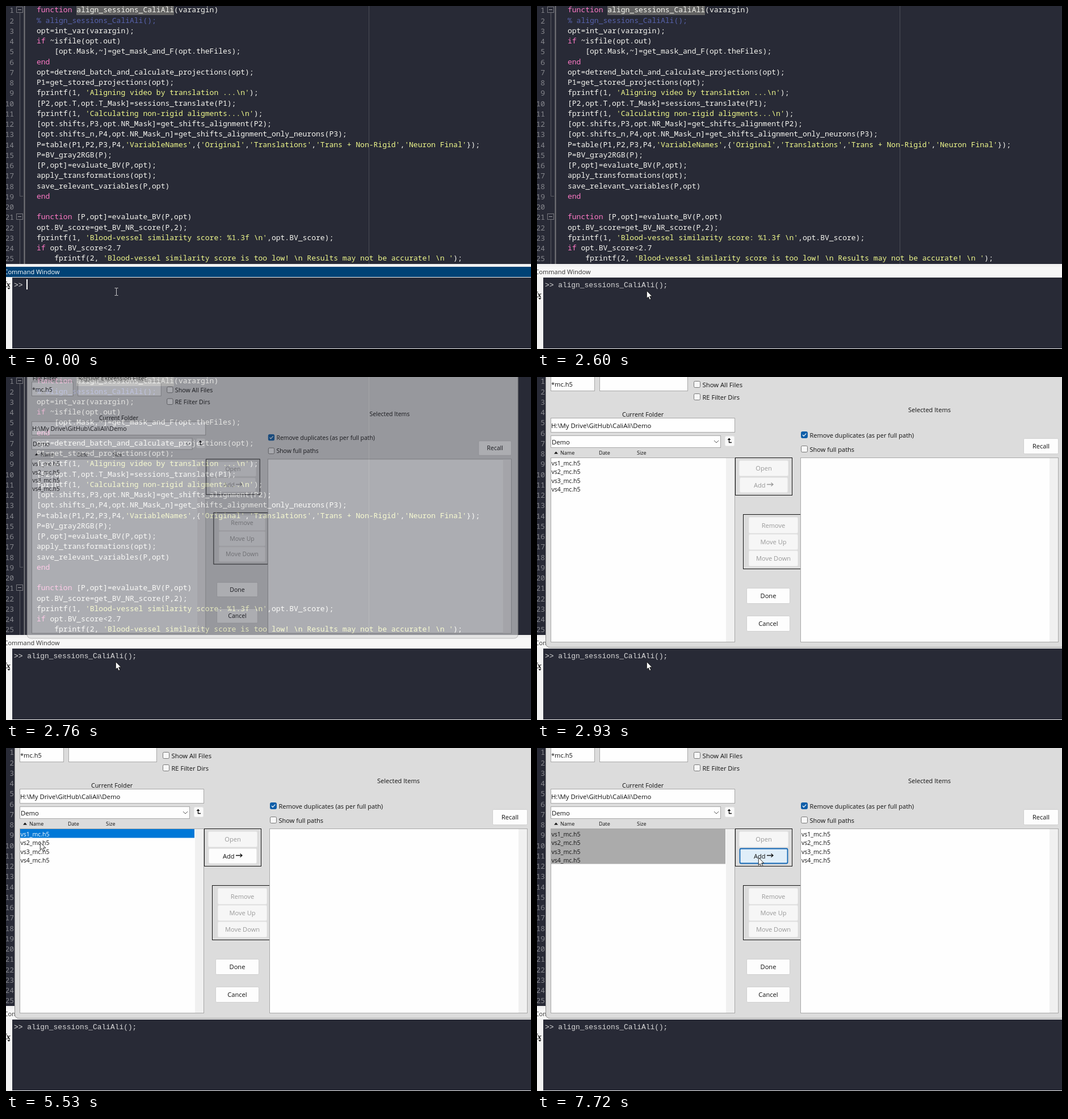
An HTML page for the animation above (8 s loop, 925x605 px).

```html
<!DOCTYPE html>
<html lang="en">
<head>
<meta charset="utf-8">
<title>Aligning sessions</title>
<style>
  html, body { margin: 0; width: 100%; height: 100%; overflow: hidden; background: #282a36; }
  svg { display: block; width: 925px; height: 605px; }
  text { white-space: pre; font-family: "Open Sans", "Noto Sans", sans-serif; }
  .code { font: 500 13.02px "Noto Sans Mono", monospace; }
  .cmd { font: 12.88px "Liberation Mono", monospace; }
  .fx { font: italic bold 14px "Liberation Serif", serif; }
</style>
</head>
<body>
<svg id="stage" viewBox="0 0 925 605"></svg>
<script>
const source = String.raw`function align_sessions_CaliAli(varargin)
% align_sessions_CaliAli();
opt=int_var(varargin);
if ~isfile(opt.out)
    [opt.Mask,~]=get_mask_and_F(opt.theFiles);
end
opt=detrend_batch_and_calculate_projections(opt);
P1=get_stored_projections(opt);
fprintf(1, 'Aligning video by translation ...\n');
[P2,opt.T,opt.T_Mask]=sessions_translate(P1);
fprintf(1, 'Calculating non-rigid aligments...\n');
[opt.shifts,P3,opt.NR_Mask]=get_shifts_alignment(P2);
[opt.shifts_n,P4,opt.NR_Mask_n]=get_shifts_alignment_only_neurons(P3);
P=table(P1,P2,P3,P4,'VariableNames',{'Original','Translations','Trans + Non-Rigid','Neuron Final'});
P=BV_gray2RGB(P);
[P,opt]=evaluate_BV(P,opt);
apply_transformations(opt);
save_relevant_variables(P,opt)
end

function [P,opt]=evaluate_BV(P,opt)
opt.BV_score=get_BV_NR_score(P,2);
fprintf(1, 'Blood-vessel similarity score: %1.3f \n',opt.BV_score);
if opt.BV_score<2.7
    fprintf(2, 'Blood-vessel similarity score is too low! \n Results may not be accurate! \n ');`.split('\n');

const files = [1, 2, 3, 4].map(n => `vs${n}_mc.h5`);

// Markup helpers
const rect = (x, y, w, h, fill, stroke = 'none', r = 0, more = '') =>
  `<rect x="${x}" y="${y}" width="${w}" height="${h}" rx="${r}" fill="${fill}" stroke="${stroke}" ${more}/>`;
const path = (d, stroke, width = 1, fill = 'none', more = '') =>
  `<path d="${d}" stroke="${stroke}" stroke-width="${width}" fill="${fill}" ${more}/>`;
const label = (x, y, s, size = 11.1, fill = '#111', more = '') =>
  `<text x="${x}" y="${y}" font-size="${size}" fill="${fill}" ${more}>${s}</text>`;
const mid = (x, y, s, size, fill) => label(x, y, s, size, fill, 'text-anchor="middle"');
const group = (id, body, more = '') => `<g id="${id}" ${more}>${body}</g>`;

const button = (x, y, w, h, s, on = true) =>
  rect(x + .5, y + .5, w - 1, h - 1, on ? '#fdfdfd' : '#f6f6f6', on ? '#cfcfcf' : '#ebebeb', 2) +
  mid(x + w / 2, y + h / 2 + 4, s, 11.1, on ? '#111' : '#999');
const field = (x, y, w, h) => rect(x + .5, y + .5, w - 1, h - 1, 'var(--field)', '#a8a8a8');
const check = (x, y, s, size, on) =>
  rect(x + .5, y + .5, 11, 11, on ? '#0f5ea8' : '#f6f6f6', on ? '#0f5ea8' : '#777', 2) +
  (on ? path(`M${x + 3} ${y + 6}l2 2.3l4.3 -4.6`, '#fff', 1.2) : '') +
  label(x + 15.5, y + 10.5, s, size);
const fileList = (x, fill) => files.map((s, i) => label(x, 155.5 + i * 15.5, s, 10.5, fill)).join('');
const list = (x, w) => field(x, 142, w, 326) + rect(x + w - 16, 143, 15, 324, '#f0f0f0');

function highlight(line) {
  const colors = { "'": '#f1fa8c', '%': '#5863ad' };
  return line.replace(/</g, '&lt;').replace(/'[^']*'|^%.*|\b(function|if|end)\b/g, s =>
    `<tspan fill="${colors[s[0]] || '#ff79c6'}">${s}</tspan>`);
}

function editor() {
  const foldBox = y => rect(18.5, y + .5, 11, 10, '#282a36', '#77787e') + path(`M21 ${y + 5.5}h6`, '#a5a5a8');
  return rect(0, 0, 925, 455, '#282a36') +
    rect(124, 0, 172, 16, '#626262') +
    path('M24.5 12V335.5H30M24.5 377V455', '#5c5d64') +
    path('M32.5 0V455', '#77777b', 2) +
    path('M639.5 0V455', '#4a4c55') +
    foldBox(1) + foldBox(366) +
    source.map((line, i) => {
      const y = Math.round(11.4 + i * 18.25);
      return `<text class="code" x="14" y="${y + 1}" fill="#85868c" text-anchor="end">${i + 1}</text>` +
        `<text class="code" x="54" y="${y}" fill="#f8f8f2">${highlight(line)}</text>`;
    }).join('');
}

function commandWindow() {
  return rect(0, 455, 925, 150, '#f2f2f2') +
    rect(0, 460, 925, 18, '#004275', 'none', 0, 'id="bar"') +
    label(-3.5, 473, 'Command Window', 11, '#fff', 'id="barText"') +
    rect(11, 479, 914, 125, '#282a36') +
    group('fx', '<text class="fx" x="-4" y="4" fill="#111">fx</text>' + path('M2.5 5h5l-2.5 3z', 'none', 0, '#111')) +
    '<text class="cmd" x="14" y="496" fill="#d9d9d9">&gt;&gt; <tspan id="command">align_sessions_CaliAli();</tspan></text>' +
    rect(36, 482, 2, 18, '#fff', 'none', 0, 'id="caret"');
}

function dialog() {
  return path('M15.5 -18V469q0 8 8 8H923q8 0 8 -8V-18z', '#8d8d8d', 1, '#dcdcdc') +
    rect(15, -27, 916, 10, '#40566c') +
    mid(49, -4, 'File Filter') + mid(175, -4, 'Regular Expression Filter') +
    field(24, -2, 78, 27) + label(25, 17, '*mc.h5', 11.1) +
    field(110, -2, 156, 27) +
    check(276, 7, 'Show All Files', 11.3) + check(276, 29, 'RE Filter Dirs', 11.1) +
    mid(186.5, 69.5, 'Current Folder', 10.8) +
    field(24, 72, 325, 26) + label(25, 89.5, 'H:\\My Drive\\GitHub\\CaliAli\\Demo', 11.35) +
    field(24, 103, 300, 22) + label(26, 118.5, 'Demo', 11.3) +
    path('M312 112l4 4l4 -4', '#555') +
    rect(331.5, 104.5, 16, 17, '#fafafa', '#eee', 2) +
    path('M343 115.5H338.5V110', '#111', 1.3) + path('M335.5 111l3 -3.5l3 3.5z', 'none', 0, '#111') +
    path('M30 135.5l3.5 -4l3.5 4z', 'none', 0, '#111') +
    label(41, 137, 'Name', 9) + label(109, 137, 'Date', 9) + label(176, 137, 'Size', 9) +
    rect(349.5, 142.5, 100, 66, 'none', '#111') + rect(363.5, 242.5, 101, 96, 'none', '#111') +
    list(24, 325) + list(464, 455) +
    rect(25, 143, 307, 15.5, '#0078d7', 'none', 0, 'id="selection"') +
    rect(25.5, 189, 306, 15, 'none', '#d98b3a', 0, 'id="focus" stroke-dasharray="1 1" opacity=".7"') +
    group('names', fileList(25.5)) + group('firstName', label(25.5, 155.5, files[0], 10.5, '#fff')) +
    group('added', fileList(466)) +
    button(356, 147, 87, 28, 'Open', false) +
    rect(357.5, 177.5, 84, 26, '#f6f6f6', '#ebebeb', 2, 'id="add"') +
    group('addText', label(382, 194.5, 'Add') + path('M405 189.5h11m-3.5 -3l3.5 3l-3.5 3', 'currentColor', 1.3)) +
    button(373, 247, 87, 29, 'Remove', false) +
    button(373, 277, 87, 28, 'Move Up', false) +
    button(373, 306, 87, 28, 'Move Down', false) +
    button(369, 372, 77, 28, 'Done') + button(369, 421, 77, 28, 'Cancel') +
    mid(691.5, 62, 'Selected Items', 11.05) +
    check(465, 96, 'Remove duplicates (as per full path)', 11.06, true) +
    check(465, 121, 'Show full paths', 11.06) +
    button(857, 108, 62, 28, 'Recall');
}

document.getElementById('stage').innerHTML = rect(0, 0, 925, 605, '#282a36') +
  editor() + commandWindow() + group('dialog', dialog()) +
  '<circle id="click" r="12" fill="#e6e63c" opacity=".65"/>' +
  group('beam', path('M-3 -6.5h2.5l.5 .5l.5 -.5h2.5M0 -6V6M-3 6.5h2.5l.5 -.5l.5 .5h2.5', '#ccc'), 'transform="translate(194.5 504)"') +
  group('arrow', path('M.3 .3V13.8L3.2 11L5.4 16L7.8 15L5.6 10H9.8Z', '#111', .9, '#fff'));

const el = {};
document.querySelectorAll('[id]').forEach(e => el[e.id] = e);
const set = (id, attrs) => { for (const k in attrs) el[id].setAttribute(k, attrs[k]); };
const show = (id, on) => { el[id].style.display = on ? '' : 'none'; };
const within = (t, a, b) => t >= a && t < b;

// Pointer moves: start time, steps, then start, control and end points
const STEP = 70;
const moves = [
  [3810, 12, 193, 502, 403, 330, 123, 167],
  [4650, 6, 123, 167, 85, 154, 58, 152],
  [5400, 4, 58, 152, 61, 171, 60, 171],
  [5880, 11, 60, 171, 62, 186, 65, 195],
  [6850, 9, 65, 195, 230, 199, 390, 193]
];
function pointer(t) {
  const move = moves.filter(m => t >= m[0]).pop();
  if (!move) return [193, 502];
  const [start, steps, x0, y0, cx, cy, x1, y1] = move;
  const p = Math.min(1, (Math.floor((t - start) / STEP) + 1) / steps);
  const e = p * p * (3 - 2 * p);
  const curve = (a, b, c) => (1 - e) ** 2 * a + 2 * e * (1 - e) * b + e * e * c;
  return [curve(x0, cx, x1), curve(y0, cy, y1)];
}

// Opening stages: time, scale, opacity
const opening = [[2690, .88, .28], [2760, .945, .62], [2830, .98, .86], [2890, .995, .97], [2930, 1, 1]];

function render(t) {
  // Command line
  show('caret', t < 390 || within(t, 870, 1470));
  set('caret', { x: t < 940 ? 36 : 230 });
  show('command', t >= 940);
  set('fx', { transform: `translate(0 ${t < 1720 ? 492 : 510})` });
  const active = t < 2600;
  set('bar', { fill: active ? '#004275' : '#f7f7f7' });
  set('barText', { fill: active ? '#fff' : '#333' });

  // Dialog
  const stage = opening.filter(o => t >= o[0]).pop();
  show('dialog', stage);
  if (stage) {
    const [, s, opacity] = stage;
    set('dialog', { opacity, transform: `translate(${407 * (1 - s)} ${186 * (1 - s)}) scale(${s})` });
    el.dialog.style.setProperty('--field', t < 2760 ? '#dcdcdc' : '#fefefe');
  }

  // File lists
  const all = t >= 6650, done = t >= 7530;
  show('selection', t >= 5260);
  set('selection', { height: all ? 61.5 : 15.5, fill: done ? '#ababab' : '#0078d7' });
  show('focus', all && !done);
  show('firstName', within(t, 5260, 6650));
  el.names.querySelectorAll('text').forEach(e => e.setAttribute('fill', all && !done ? '#fff' : '#111'));
  el.names.firstChild.style.display = within(t, 5260, 6650) ? 'none' : '';
  show('added', done);

  // Add button
  const ready = t >= 5400, hover = t >= 7390, focused = t >= 7460;
  set('add', {
    fill: hover ? '#e0eef9' : ready ? '#fdfdfd' : '#f6f6f6',
    stroke: hover ? '#1267b4' : t >= 5740 ? '#d0d0d0' : '#ebebeb',
    'stroke-width': focused ? 1.8 : 1
  });
  const ink = ready ? '#111' : '#999';
  el.addText.style.color = ink;
  el.addText.firstChild.setAttribute('fill', ink);

  // Pointer
  const [x, y] = pointer(t);
  show('beam', active);
  show('arrow', !active);
  set('arrow', { transform: `translate(${x} ${y})` });
  show('click', within(t, 5260, 5400) || within(t, 6650, 6850) || within(t, 7460, 7590));
  set('click', { cx: x, cy: y });
}

const began = performance.now();
(function tick() {
  render((performance.now() - began) % 8000);
  requestAnimationFrame(tick);
})();
</script>
</body>
</html>
```
